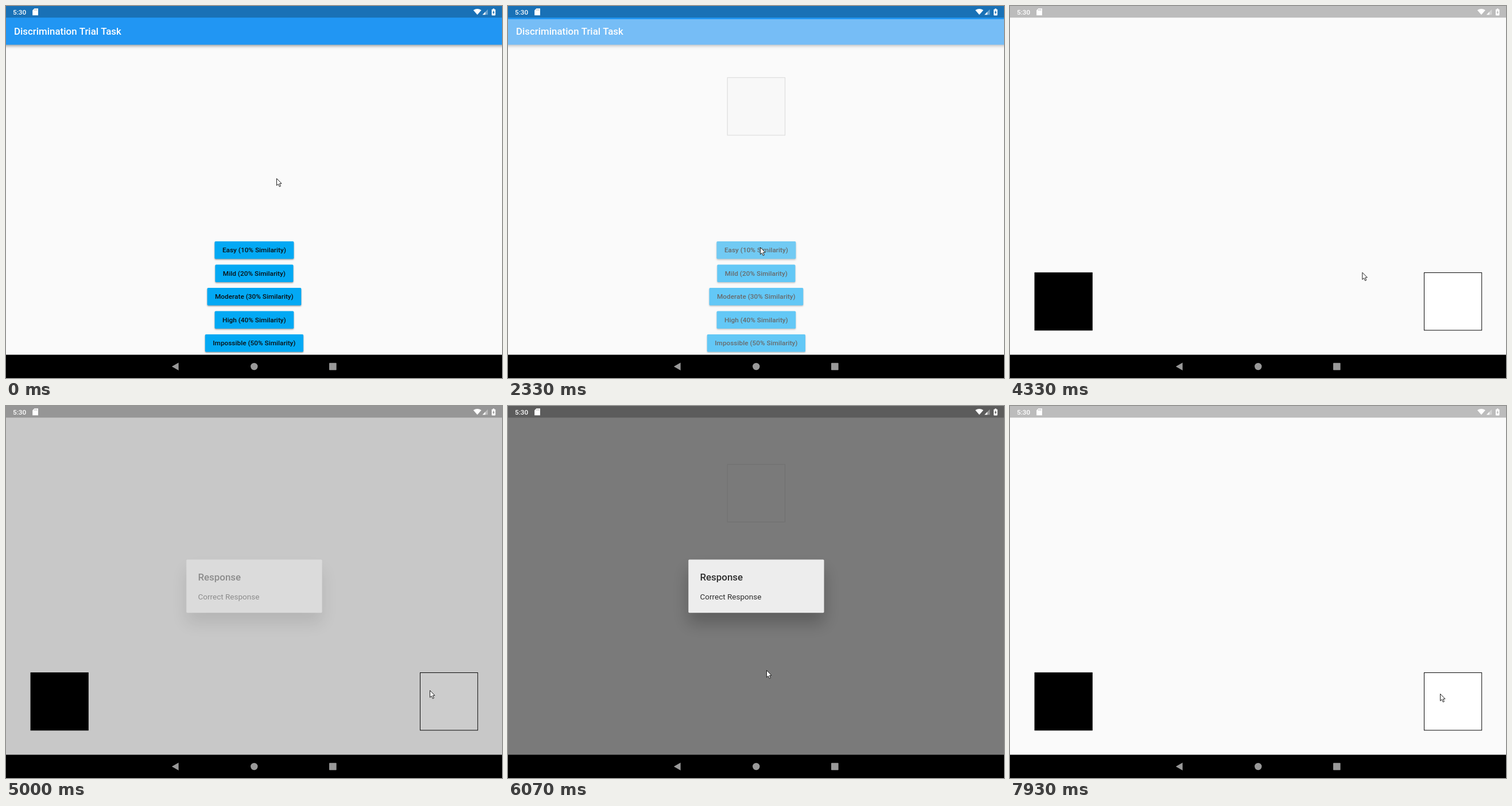
These frames come from a looping animation (864 by 648 pixels, 8000 ms). An HTML page with a canvas:

```html
<!DOCTYPE html>
<html lang="en">
<head>
<meta charset="utf-8">
<title>Discrimination Trial Task</title>
<style>
html, body { margin: 0; width: 100%; height: 100%; overflow: hidden; background: #000; }
canvas { display: block; width: 864px; height: 648px; }
</style>
</head>
<body>
<canvas id="stage" width="864" height="648"></canvas>
<script>
const W = 864, H = 648, LOOP = 8000, TICK = 1000 / 15;
const DP = 0.84375;      // pixels per layout unit
const SHIFT = 0.4;       // horizontal offset of the app surface
const BG = '#fafafa';

const screen = document.getElementById('stage').getContext('2d');
const buffer = Object.assign(document.createElement('canvas'), { width: W, height: H });
const layer = buffer.getContext('2d');
let g = screen;

// Times in ms
const PRESS = 2023, PUSH = 2163, FADE = 500;
const DIALOG_IN = 4965, DIALOG_OUT = 6022;
const MOVES = [
  { from: 800, to: 1733, x: 439.5, y: 420.5 },
  { from: 4000, to: 4600, x: 738.5, y: 495.5 },
  { from: 5130, to: 5667, x: 450.5, y: 460.5 },
  { from: 7200, to: 7933, x: 749.5, y: 501.5 }
];

const clamp = v => Math.min(1, Math.max(0, v));
const ramp = (t, start, span) => clamp((t - start) / span);
const smooth = v => v * v * (3 - 2 * v);

function bezier(x1, y1, x2, y2) {
  const at = (a, b, u) => 3 * a * u * (1 - u) ** 2 + 3 * b * u * u * (1 - u) + u ** 3;
  return x => {
    let lo = 0, hi = 1;
    for (let i = 0; i < 24; i++) {
      const mid = (lo + hi) / 2;
      if (at(x1, x2, mid) < x) lo = mid; else hi = mid;
    }
    return at(y1, y2, (lo + hi) / 2);
  };
}
const ease = bezier(0.25, 0.1, 0.25, 1);
const easeIn = bezier(0.42, 0, 1, 1);
const easeOut = bezier(0, 0, 0.58, 1);
const fastOutSlowIn = bezier(0.4, 0, 0.2, 1);

const useUnits = () => g.setTransform(DP, 0, 0, DP, SHIFT, 0);
const usePixels = () => g.setTransform(1, 0, 0, 1, 0, 0);

function rect(color, x, y, w, h) {
  g.fillStyle = color;
  g.fillRect(x, y, w, h);
}

function poly(color, ...points) {
  g.beginPath();
  points.forEach(([x, y]) => g.lineTo(x, y));
  g.closePath();
  g.fillStyle = color;
  g.fill();
}

function text(str, x, y, size, weight, color, align = 'left') {
  g.font = `${weight} ${size}px Roboto, sans-serif`;
  g.textAlign = align;
  g.fillStyle = color;
  g.fillText(str, x, y);
}

function withShadow(blur, dy, alpha, draw) {
  g.save();
  g.shadowColor = `rgba(0,0,0,${alpha})`;
  g.shadowBlur = blur;
  g.shadowOffsetY = dy;
  draw();
  g.restore();
}

function roundRect(x, y, w, h, r) {
  g.beginPath();
  g.roundRect(x, y, w, h, r);
}

// Draws a group off screen, then blends it in as one picture.
function blend(alpha, dy, draw) {
  if (alpha <= 0) return;
  g = layer;
  usePixels();
  g.clearRect(0, 0, W, H);
  useUnits();
  draw();
  g = screen;
  usePixels();
  g.globalAlpha = alpha;
  g.drawImage(buffer, 0, dy);
  g.globalAlpha = 1;
  useUnits();
}

function button(label, row, t) {
  g.font = '500 14px Roboto, sans-serif';
  const w = g.measureText(label).width + 32;
  const x = 512 - w / 2, y = 486 + 48 * row;
  const pressed = row === 0
    ? ramp(t, PRESS, 200) * (1 - ramp(t, PUSH, 200)) : 0;

  roundRect(x, y, w, 36, 2);
  withShadow(2.5 + 4 * pressed, 1.5 + 2.5 * pressed, 0.36, () => {
    g.fillStyle = '#03a9f4';
    g.fill();
  });
  if (pressed > 0) {
    g.save();
    g.clip();
    rect(`rgba(188,188,188,${0.4 * pressed})`, x, y, w, 36);
    const held = Math.min(t, PUSH) - PRESS;
    const radius = 92 * clamp(held / 1000 + ramp(t, PUSH, 92));
    g.beginPath();
    g.arc(521, 498, radius, 0, 7);
    g.fillStyle = `rgba(200,200,200,${0.4 * (1 - ramp(t, PUSH, 200))})`;
    g.fill();
    g.restore();
  }
  text(label, 512, y + 22.8, 14, 500, '#0b0f12', 'center');
}

function menuPage(t) {
  rect(BG, -2, 0, 1030, 768);
  withShadow(5, 2.5, 0.36, () => rect('#2196f3', -10, -10, 1044, 90));
  text('Discrimination Trial Task', 16, 58.9, 20, 500, '#fff');
  ['Easy (10%', 'Mild (20%', 'Moderate (30%', 'High (40%', 'Impossible (50%']
    .forEach((name, row) => button(name + ' Similarity)', row, t));
}

function square(x, y, fill) {
  rect('#000', x, y, 120, 120);
  rect(fill, x + 1.15, y + 1.15, 117.7, 117.7);
}

function trialPage(t) {
  rect(BG, -2, 0, 1030, 768);
  const start = t < DIALOG_OUT ? PUSH : DIALOG_OUT;
  const alpha = ramp(t, start, FADE) - ramp(t, start + FADE, FADE);
  if (t >= start + 2 * FADE) {
    square(50, 550, '#000');
    square(854, 550, '#fff');
  } else if (alpha > 0) {
    // Border and fill do not overlap, so each can fade separately.
    g.globalAlpha = alpha;
    rect('#e6e6e6', 453, 121, 118, 118);
    g.strokeStyle = '#000';
    g.lineWidth = 1.15;
    g.strokeRect(452.5, 120.5, 119, 119);
    g.globalAlpha = 1;
  }
}

function dialog() {
  roundRect(372, 317, 280, 110, 2);
  withShadow(29, 18, 0.27, () => {
    g.fillStyle = '#fff';
    g.fill();
  });
  text('Response', 396, 359.8, 20, 500, 'rgba(0,0,0,.87)');
  text('Correct Response', 396, 399.2, 16, 400, 'rgba(0,0,0,.87)');
}

function statusBar() {
  rect('rgba(0,0,0,.25)', 0, 0, W, 20.25);
  text('5:30', 12, 14.8, 11.8, 500, '#fff');

  // Memory card
  poly('#fff', [49.4, 4.3], [56, 4.3], [56, 16.2], [46.2, 16.2], [46.2, 7.6]);
  for (let i = 0; i < 3; i++) rect('rgba(0,0,0,.3)', 49.3 + 2 * i, 5.6, 0.9, 2.4);

  // Wireless fan
  g.beginPath();
  g.moveTo(821, 15.2);
  g.lineTo(814, 7.2);
  g.quadraticCurveTo(821, 2.8, 828, 7.2);
  g.closePath();
  g.fillStyle = '#fff';
  g.fill();

  // Signal wedge
  poly('rgba(255,255,255,.35)', [839.3, 5.8], [839.3, 15.2], [830, 15.2]);
  poly('#fff', [835, 10.2], [835, 15.2], [830, 15.2]);

  // Battery with a cut-out bolt
  g.beginPath();
  g.roundRect(846, 5.8, 6.6, 10.6, 0.8);
  g.rect(848, 4.6, 2.6, 1.2);
  [[849.9, 7.4], [847.4, 11.7], [848.8, 11.7], [848.8, 14.8], [851.2, 10.4], [849.9, 10.4]]
    .forEach(([x, y], i) => i ? g.lineTo(x, y) : g.moveTo(x, y));
  g.closePath();
  g.fillStyle = '#fff';
  g.fill('evenodd');
}

function navBar() {
  rect('#000', 0, 607.5, W, 41);
  poly('#999', [288.8, 628], [300.6, 621.2], [300.6, 634.8]);
  g.beginPath();
  g.arc(432.3, 628, 6.2, 0, 7);
  g.fill();
  roundRect(563, 621.8, 12.6, 12.4, 0.8);
  g.fill();
}

function cursor(t) {
  let x = 471.5, y = 300.5;
  for (const m of MOVES) {
    const k = smooth(ramp(t, m.from, m.to - m.from));
    x += (m.x - x) * k;
    y += (m.y - y) * k;
  }
  g.save();
  g.translate(x, y);
  g.lineJoin = 'miter';
  poly('#fff', [0, 0], [0, 12.2], [2.8, 9.7], [4.8, 14.2], [6.9, 13.3], [4.9, 8.9], [8.5, 8.7]);
  g.strokeStyle = '#111';
  g.lineWidth = 0.95;
  g.stroke();
  g.restore();
}

function draw(time) {
  const t = Math.floor((time % LOOP + 5) / TICK) * TICK;
  useUnits();

  const push = ramp(t, PUSH, 300);
  if (push < 1) {
    menuPage(t);
    blend(easeIn(push), 152 * (1 - fastOutSlowIn(push)), () => trialPage(t));
  } else {
    trialPage(t);
  }

  const shown = ramp(t, DIALOG_IN, 150) - ramp(t, DIALOG_OUT, 150);
  if (shown > 0) {
    rect(`rgba(0,0,0,${0.54 * ease(shown)})`, -2, 0, 1030, 768);
    blend(easeOut(shown), 0, dialog);
  }

  usePixels();
  statusBar();
  navBar();
  cursor(t);
}

const begin = performance.now();
function frame() {
  draw(performance.now() - begin);
  requestAnimationFrame(frame);
}
frame();
</script>
</body>
</html>
```
